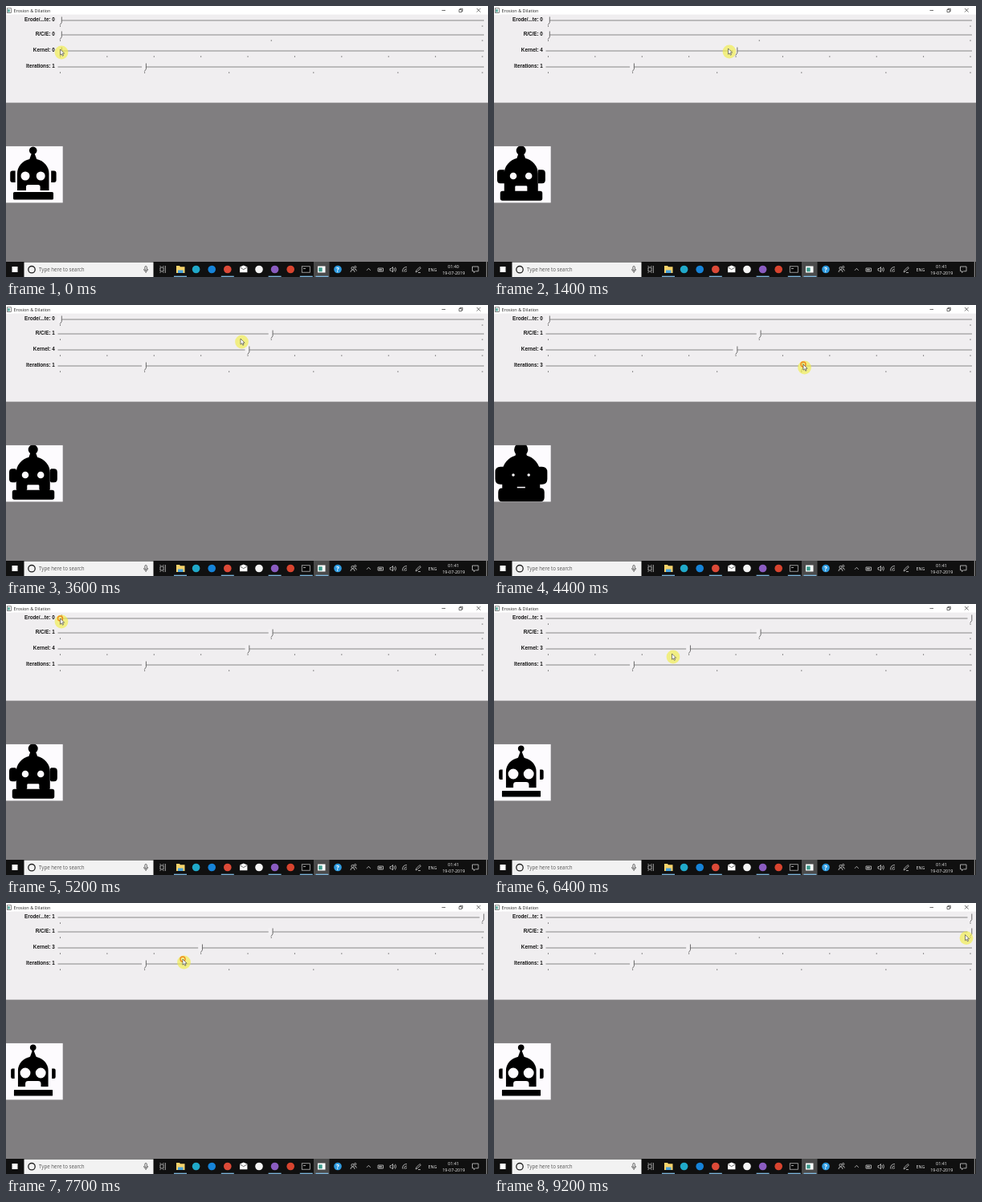
Recreate the animation shown at these times as an HTML page. Size 600 by 338 pixels, loop 9.6 s.

```html
<!DOCTYPE html>
<html lang="en">
<head>
<meta charset="utf-8">
<title>Erosion &amp; Dilation</title>
<style>
  html, body { margin: 0; height: 100%; overflow: hidden; background: #807e80; }
  svg { display: block; width: 100vw; height: 100vh; }
  text { font-family: "Open Sans", "Noto Sans", sans-serif; }
  .label { font: bold 6.3px "Liberation Sans", Arial, sans-serif; fill: #111; text-anchor: end; }
  .line { fill: none; stroke: #ccc; stroke-width: .8; }
  .dark { fill: none; stroke: #333; stroke-width: .7; }
</style>
</head>
<body>
<svg viewBox="0 0 600 338">
  <rect width="600" height="338" fill="#807e80"/>
  <rect width="600" height="120.6" fill="#f0eef0"/>
  <rect width="600" height="10.6" fill="#fff"/>

  <!-- title bar -->
  <rect x="1.5" y="2.8" width="5" height="5.6" fill="#fff" stroke="#555" stroke-width=".7"/>
  <rect x="2.4" y="4.2" width="2.2" height="3.3" fill="#3d9a8c"/>
  <text x="9.5" y="8" font-size="5.5" fill="#222">Erosion &amp; Dilation</text>
  <path class="dark" d="M542.5 5.5h4.5M564 4.5h3.2v3.2h-3.2zM565 4.5v-1.2h3.3v3.3h-1M586 3l4.6 4.6m0-4.6l-4.6 4.6"/>

  <g id="sliders"></g>

  <!-- processed picture -->
  <clipPath id="frame"><rect y="174.7" width="70.7" height="70.7"/></clipPath>
  <g clip-path="url(#frame)">
    <rect y="174.7" width="71" height="71" fill="#fdfbfe"/>
    <path id="robot" fill-rule="evenodd" d="
      M14 230V209A19.8 18.5 0 0 1 29.3 191L31.6 184.6A4.8 4.8 0 1 1 35.8 184.6L38.2 191
      A19.8 18.5 0 0 1 53.5 209V230H42.6V225.5Q42.6 223 40 223H27.6Q25 223 25 225.5V230Z
      M18.5 212a5.5 5.5 0 1 0 11 0a5.5 5.5 0 1 0 -11 0Z
      M37.7 212a5.5 5.5 0 1 0 11 0a5.5 5.5 0 1 0 -11 0Z
      M11.6 205.5V220H8Q5.2 220 5.2 217V208.5Q5.2 205.5 8 205.5Z
      M56.2 205.5V220H59.8Q62.6 220 62.6 217V208.5Q62.6 205.5 59.8 205.5Z
      M10.5 232H57.5Q59 232 59 233.5V240Q59 241.5 57.5 241.5H10.5Q9 241.5 9 240V233.5Q9 232 10.5 232Z"/>
  </g>

  <!-- taskbar -->
  <rect y="319" width="600" height="19" fill="#101010"/>
  <rect x="22.5" y="319.5" width="161" height="18.5" fill="#f2f2f2"/>
  <rect x="7.5" y="325" width="7" height="7" fill="#fff"/>
  <circle cx="32" cy="328.7" r="4.2" fill="none" stroke="#222" stroke-width="1.3"/>
  <text x="41" y="331" font-size="6.2" fill="#555">Type here to search</text>
  <rect x="172.9" y="324.5" width="2.4" height="5" rx="1.2" fill="none" stroke="#333" stroke-width=".7"/>
  <path class="dark" d="M171.6 328q0 3 2.5 3t2.5-3M174.1 331v2"/>
  <path class="line" d="M192 326h4v5h-4zM192 324v1m4-1v1m-4 7v1m4-1v1M198.3 324v9"/>
  <rect x="383" y="319" width="19.5" height="19" fill="#4b4b4b"/>
  <g id="apps"></g>
  <path d="M212 324h4l1 1.3h5.5V333H212z" fill="#f6d36b"/>
  <rect x="214" y="329.5" width="6.5" height="3.5" fill="#4aa3dc"/>
  <path d="M291 325.5l4.7-2 4.7 2v6.7H291z" fill="#fff"/>
  <path class="dark" d="M291 325.7l4.7 3 4.7-3"/>
  <rect x="368.3" y="324.8" width="10" height="7.4" fill="#050505" stroke="#bbb" stroke-width=".8"/>
  <path class="line" d="M370 327.5h3"/>
  <rect x="388" y="324.5" width="9.5" height="8" fill="#fff"/>
  <rect x="389.2" y="326.3" width="4.5" height="5" fill="#3d9a8c"/>
  <text x="413" y="331.5" font-size="8" font-weight="bold" fill="#fff" text-anchor="middle">?</text>
  <g class="line">
    <circle cx="431.5" cy="327" r="1.6"/><circle cx="434.7" cy="325.6" r="1.2"/>
    <path d="M429 332q0-3 2.5-3t2.5 3M434 328.3q2.3-.5 2.3 2.2
      M449 329.8l2.4-2.5 2.4 2.5M463 327h6.5v4h-6.5zM464 328.5h4M464 330h4
      M478 327.5h1.5l2-2v6.5l-2-2H478zM483 327q1.2 1.6 0 3.4M484.5 325.8q2 2.8 0 5.8
      M493.5 331.5q0-6 5.5-6M495.5 331.7q0-3.8 3.5-3.8M497.5 331.8q0-1.6 1.5-1.6
      M510 332l1-2.5 4-4 1.4 1.3-4 4zM513 332.5h3
      M580.5 325h7.5v5.8h-3.6l-1.8 1.8v-1.8h-2.1zM598.3 319v19"/>
  </g>
  <g font-size="5.4" fill="#f2f2f2" text-anchor="middle">
    <text x="531" y="330.8">ENG</text>
    <text id="clock" x="557" y="326.5"></text>
    <text x="557.3" y="335">19-07-2019</text>
  </g>

  <g id="pointer">
    <circle cx="1.5" cy="4" r="8.4" fill="#f1ee48" fill-opacity=".65"/>
    <circle id="ring" r="3" fill="none" stroke="#ef8a1d" stroke-width="1.4"/>
    <path d="M0 0V7.2L1.7 5.7 2.8 8.2 4 7.7 2.9 5.2H5.1Z" fill="#fff" stroke="#333" stroke-width=".6"/>
  </g>
</svg>
<script>
const $ = id => document.getElementById(id);
const LEFT = 67.5, SPAN = 525.5;
const MODE = 0, SHAPE = 1, KERNEL = 2, ROUNDS = 3;

const sliders = [
  { name: "Erode/...te", y: 18, max: 1, start: 0 },
  { name: "R/C/E", y: 36, max: 2, start: 0 },
  { name: "Kernel", y: 56, max: 9, start: 0 },
  { name: "Iterations", y: 76, max: 5, start: 1 }
];

// pointer moves: arrival in steps of 100 ms, place, slider held on the way
const moves = [
  [0, 67.5, 54], [1, 388, 326], [4, 67.5, 53], [6, 67.5, 53],
  [14, 291.5, 53, KERNEL], [21, 67.5, 31],
  [29, 584, 30, SHAPE], [34, 291, 38, SHAPE], [36, 292, 42], [40, 173, 72],
  [44, 385, 74, ROUNDS], [48, 175, 72, ROUNDS], [52, 67.5, 18],
  [54, 548, 4, MODE], [59, 300, 53],
  [64, 221.5, 62, KERNEL], [67, 173, 72],
  [70, 584, 72, ROUNDS], [74, 180, 72, ROUNDS], [77, 220, 70],
  [84, 586.5, 39.6, SHAPE]
].map(([end, x, y, held], i, all) => ({ begin: i ? all[i - 1][0] : 0, end, x, y, held }));

function pointerAt(step) {
  const i = moves.findIndex(m => m.end >= step);
  const to = moves.at(i), from = moves[Math.max(0, i - 1)];
  if (i < 1) return [to.x, to.y];
  const k = (step - to.begin) / (to.end - to.begin), eased = k * k * (3 - 2 * k);
  return [from.x + (to.x - from.x) * eased, from.y + (to.y - from.y) * eased];
}

function valueAt(index, step) {
  const { max, start } = sliders[index];
  const drag = moves.findLast(m => m.held === index && m.begin <= step);
  if (!drag) return start;
  const x = pointerAt(Math.min(step, drag.end))[0];
  return Math.max(0, Math.min(max, Math.round((x - LEFT) / SPAN * max)));
}

$("sliders").innerHTML = sliders.map(({ y, max }, i) => {
  let ticks = "";
  for (let n = 0; n <= max; n++) ticks += `M${LEFT + SPAN * n / max} ${y + 6.4}v1.4`;
  return `<text id="label${i}" class="label" x="60.8" y="${y + 1}"></text>
    <path d="M64.5 ${y}H595" stroke="#6c6c6c" stroke-width=".8"/>
    <path d="${ticks}" stroke="#555" stroke-width=".9"/>
    <g id="thumb${i}"><path d="M-3.5 -5H2V3L-.5 6 -3.5 3Z" fill="#f3f1f3"/>
    <path class="dark" d="M1.8 -4.5V2.6L-.3 5.6"/></g>`;
}).join("");

// evenly spaced app marks; "" leaves room for a drawn icon, "_" underlines an open app
$("apps").innerHTML = ["_", "#20a9c9", "#1683d8", "#dc4a38_", "", "#f5f5f5",
  "#8a5cc0_", "#d8442f", "_", "_", "#2f9be0"].map((app, i) => {
  const x = 217 + 19.6 * i, color = app.replace("_", "");
  return (color && `<circle cx="${x}" cy="328.5" r="4.8" fill="${color}"/>`) +
    (app.endsWith("_") ? `<path d="M${x - 8} 337.3h16" stroke="#86c4ee" stroke-width="1.2"/>` : "");
}).join("");

function draw(now) {
  let step = Math.floor(now % 9600 / 100);
  if (step % 10 === 5) step--;

  const [shrink, shape, kernel, rounds] = sliders.map((s, i) => {
    const value = valueAt(i, step);
    $("label" + i).textContent = `${s.name}: ${value}`;
    $("thumb" + i).setAttribute("transform", `translate(${LEFT + SPAN * value / s.max} ${s.y})`);
    return value;
  });

  // a stroke of half the kernel on each side grows or shrinks the black area
  const style = $("robot").style;
  style.stroke = shrink ? "#fdfbfe" : "#000";
  style.strokeWidth = 2 * kernel * rounds / 3.2;
  style.strokeLinejoin = ["miter", "bevel", "round"][shape];

  const pressed = moves.some(m => m.held !== undefined && m.begin <= step && step < m.end);
  $("ring").style.display = pressed ? "" : "none";
  $("pointer").setAttribute("transform", `translate(${pointerAt(step)})`);
  $("clock").textContent = step < 8 ? "01:40" : "01:41";
  requestAnimationFrame(draw);
}
requestAnimationFrame(draw);
</script>
</body>
</html>
```
